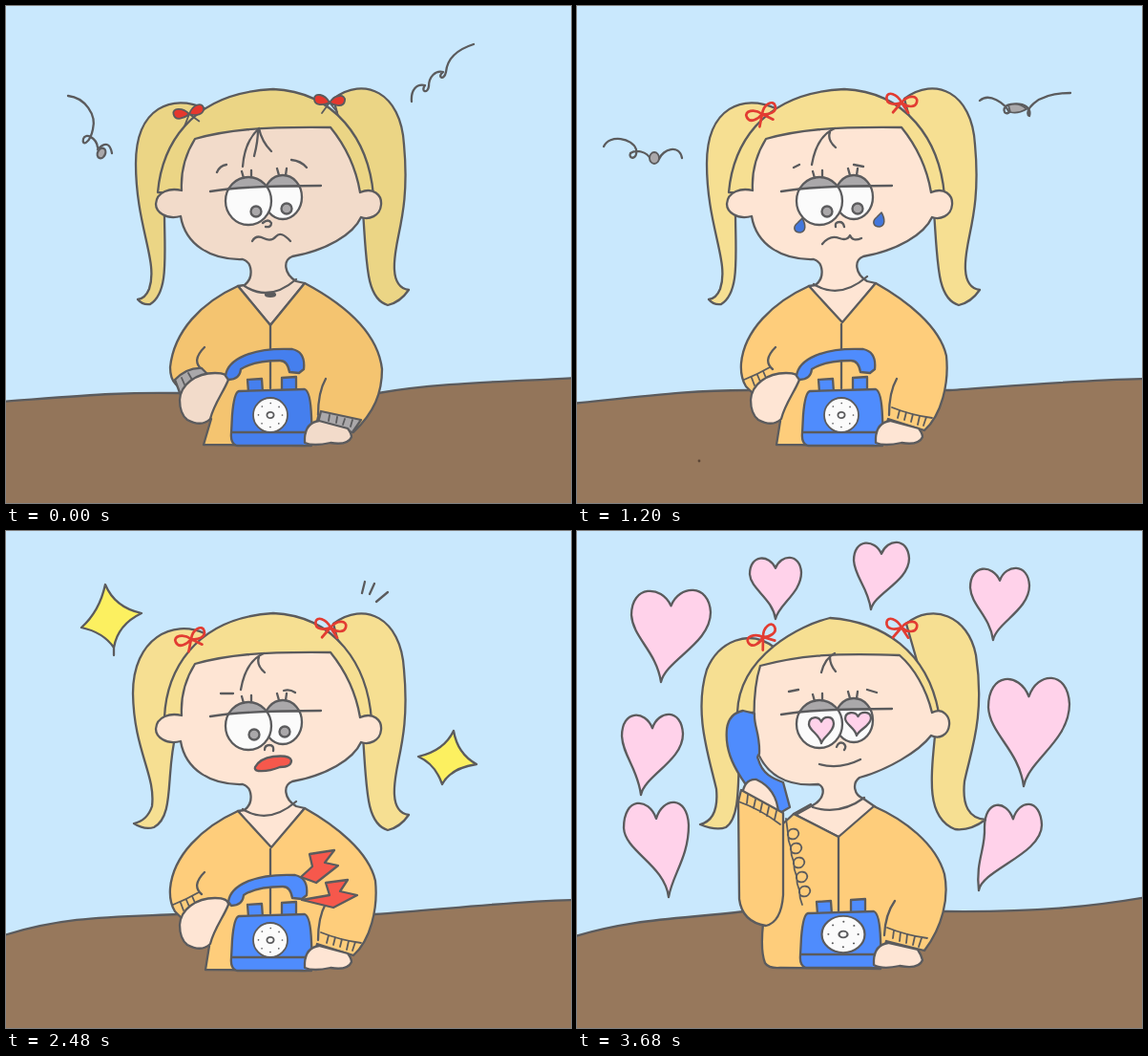
Write an HTML page that moves like this. It is 592 by 520 pixels and loops after 3760 ms.

```html
<!DOCTYPE html>
<html lang="en">
<head>
<meta charset="utf-8">
<title>Waiting for the call</title>
<style>
  html, body { margin: 0; width: 100%; height: 100%; overflow: hidden; background: #c9e8fd; }
  svg {
    display: block; width: 592px; height: 520px;
    --hair: #f6df92; --skin: #fee5d4; --shirt: #fecd7b; --phone: #4f8cfd; --table: #97785c;
    fill: none; stroke: #5b5b5d; stroke-width: 2.3; stroke-linecap: round; stroke-linejoin: round;
  }
  svg.dull { --hair: #ebd585; --skin: #f2dbca; --shirt: #f4c470; --phone: #457fee; --table: #93755a; }
  .hair { fill: var(--hair); } .skin { fill: var(--skin); } .shirt { fill: var(--shirt); }
  .phone { fill: var(--phone); } .grey { fill: #aaa8aa; } .white { fill: #fbfbfb; }
  .red { fill: #f6584c; } .pink { fill: #ffd2ea; } .tear { fill: #4377dc; stroke-width: 1.6; }
  .star { fill: #fcf060; } .ribbon { stroke: #e23c32; stroke-width: 2.7; }
  .thin { stroke-width: 1.8; } .flat { stroke: none; }
</style>
</head>
<body>
<!-- data-on lists the poses (0-5) in which a part is visible -->
<svg viewBox="0 0 592 520">
  <defs>
    <path id="bow" d="M0 0C-5-9-16-11-16-4C-16 4-6 3 0 0C6-9 17-9 16-2C15 5 6 4 0 0L-8 11M0 0L8 10"/>
    <path id="drop" d="M3-8C7-1 7 6 1 7C-6 7-7 1-2-3Z"/>
    <path id="curl" d="M0 0C2-7 13-5 11 2C8 9-2 7 0 0Q0 8 3 15"/>
    <g id="base">
      <path d="M254 404L253 391L268 390L269 404ZM289 403L289 389L304 388L304 403Z"/>
      <path d="M244 403L313 401Q319 403 320 430L321 455Q320 461 310 460L242 460Q235 458 236 447L237 428Q239 404 244 403ZM236 446L321 446"/>
    </g>
    <g id="dial">
      <circle class="white thin" r="18"/>
      <ellipse class="thin" rx="3.6" ry="3.2"/>
      <circle r="12.5" stroke-width="1.7" stroke-dasharray="0 9.8"/>
    </g>
  </defs>

  <path id="table" fill="var(--table)"/>
  <circle data-on="1" cx="128" cy="476" r="1.4" fill="#5b4636" stroke="none"/>

  <!-- squiggles -->
  <g data-on="0">
    <path d="M65 94C83 96 95 114 91 129C88 144 79 147 81 139C83 132 95 138 96 148"/>
    <ellipse class="grey" cx="100" cy="154" rx="4" ry="5.5" transform="rotate(25 100 154)"/>
    <path d="M96 150Q108 138 111 154M490 40C468 47 462 58 461 69C459 79 451 74 458 69C450 67 443 74 443 84C442 92 434 90 439 83C430 81 424 88 425 100"/>
  </g>
  <g data-on="1">
    <path d="M28 147C34 134 58 138 62 150C64 162 53 160 56 154C62 150 73 152 77 160M86 160C90 150 107 144 110 159"/>
    <ellipse class="grey thin" cx="81" cy="159" rx="5" ry="6"/>
    <path d="M422 99C432 90 448 102 453 111C447 116 444 104 454 103C470 100 476 108 474 115C468 112 478 91 517 91"/>
    <path class="grey thin" d="M452 104Q463 100 471 108Q462 113 454 111Z"/>
  </g>

  <!-- stars -->
  <g data-on="3">
    <path class="star" d="M104 56Q114 80 142 86Q117 98 113 122Q102 106 79 101Q98 84 104 56ZM113 121V130M469 209Q473 233 493 244Q466 248 457 265Q450 244 432 236Q459 230 469 209Z"/>
    <path d="M373 65L376 53M381 66L386 55M388 74L400 64"/>
  </g>

  <g id="hearts4" class="pink" data-on="4"></g>
  <g id="hearts8" class="pink" data-on="5"></g>
  <path data-on="4" class="thin" d="M107 282L124 279M110 290L124 289M430 283L441 278M437 287L455 277"/>

  <!-- pigtails -->
  <g class="hair">
    <path data-on="01" d="M208 107C175 92 136 105 136 165C136 230 160 268 150 296Q146 306 138 307Q143 313 151 312C171 300 166 260 166 215Z"/>
    <path data-on="23" d="M208 107C175 92 133 112 133 170C134 230 157 255 153 288Q148 303 134 306Q145 313 155 310C177 298 167 255 178 212Z"/>
    <path data-on="0123" d="M343 97C375 73 414 90 417 145C424 220 405 245 407 276Q408 295 422 297Q413 310 400 313C377 306 378 270 374 215Z"/>
    <path data-on="4" d="M204 122C190 106 154 110 134 130C112 165 128 205 135 232Q135 264 103 266C130 274 152 258 148 228C144 204 148 182 160 184Q170 186 174 198ZM346 101C372 84 405 104 413 142C420 185 416 220 425 238Q437 253 454 243Q444 264 428 272C402 270 390 252 391 225C393 190 392 160 376 157Z"/>
    <path data-on="5" d="M207 122C180 101 148 116 136 145C122 190 138 235 146 270Q149 302 129 307Q146 314 156 310C174 298 167 250 172 195ZM345 97C372 75 410 88 418 130C428 195 412 232 406 262Q402 300 428 302Q412 314 396 312C366 300 370 262 376 205Z"/>
    <!-- crown -->
    <path data-on="01" d="M159 195C163 150 190 91 280 87C345 90 380 140 385 198Z"/>
    <path data-on="23" d="M166 195C168 150 195 91 280 86C345 89 379 140 383 198Z"/>
    <path data-on="4" d="M173 190C175 140 205 96 272 93C325 96 370 140 380 190Z"/>
    <path data-on="5" d="M168 190C170 130 235 98 265 91C320 95 367 125 379 190Z"/>
  </g>

  <!-- face and neck -->
  <g class="skin">
    <path data-on="0123" d="M198 139C230 130 265 126 340 127C353 143 366 165 371 195C385 189 394 198 393 208C392 220 380 224 372 221C364 239 335 256 300 262C290 266 291 280 304 288L313 290L277 334L243 293L250 292C260 284 258 268 248 265C215 266 188 250 183 220C167 224 157 215 157 207C158 194 172 190 184 193C183 175 188 155 198 139Z"/>
    <path data-on="45" d="M192 141C230 131 265 127 338 130C353 143 366 165 372 190C384 184 391 195 390 203C389 214 379 218 371 214C358 231 325 250 296 258C288 264 290 276 300 280L313 289L276 321L229 297L247 287C260 280 260 268 253 265C220 268 196 255 187 225C184 190 186 160 192 141Z"/>
  </g>
  <path data-on="0" d="M265 128C252 140 249 155 248 168M264 129Q264 142 260 157M265 128Q268 142 278 152M250 293Q276 310 304 286"/>
  <ellipse data-on="0" cx="277" cy="302" rx="5" ry="1.8" fill="#5b5b5d"/>
  <path data-on="123" d="M270 128C256 134 249 149 246 166M265 132Q262 140 271 148M248 291Q275 308 304 283"/>
  <path data-on="45" d="M270 128C262 132 258 140 256 148M265 132Q265 140 271 147M247 289Q275 298 301 279"/>

  <!-- eyes -->
  <g id="eyes">
    <ellipse class="white flat" cx="290" cy="200" rx="20" ry="23"/>
    <path class="grey flat" d="M272 190A20 23 0 0 1 308 190Z"/>
    <ellipse cx="290" cy="200" rx="20" ry="23"/>
    <ellipse class="white flat" cx="254" cy="204" rx="24" ry="25"/>
    <path class="grey flat" d="M234 190A24 25 0 0 1 274 190Z"/>
    <ellipse cx="254" cy="204" rx="24" ry="25"/>
    <path d="M214 194Q250 188 330 188M249 180L247 173M257 179V172M286 177L284 170M293 177L294 170"/>
  </g>
  <g id="pupils" class="grey" data-on="01234">
    <ellipse cx="262" cy="215" rx="5.5" ry="5.5"/><ellipse cx="294" cy="212" rx="5.5" ry="5.5"/>
  </g>
  <g id="heartEyes" class="pink" data-on="5"></g>

  <!-- brows, nose, mouth -->
  <path data-on="0" d="M221 174Q224 167 231 166M299 161Q309 162 315 169M269 227Q275 222 278 227Q278 232 272 231M258 246Q262 239 270 243T283 241T298 246"/>
  <path data-on="12" d="M227 169L233 166M290 166L300 168M271 231Q270 226 275 226Q279 226 280 231M257 249Q265 239 275 243Q283 246 286 240Q289 247 298 243"/>
  <path data-on="3" d="M225 170L238 170M291 167Q297 165 303 169M271 229Q271 224 276 224Q281 224 280 230"/>
  <path data-on="3" class="red" d="M261 247Q266 238 280 236Q297 234 299 240Q299 247 287 247Q275 252 264 251Q260 250 261 247Z"/>
  <path data-on="4" d="M223 167L238 166M299 163L312 160M272 228Q273 222 279 222Q283 225 280 230M255 244Q285 252 300 235"/>
  <path data-on="5" d="M222 168L232 166M304 166L314 169M272 226Q274 220 279 222Q283 225 280 229M254 244Q275 250 297 239"/>
  <g class="tear">
    <g data-on="1"><use href="#drop" x="233" y="230"/><use href="#drop" x="316" y="224"/></g>
    <g data-on="2"><use href="#drop" x="234" y="247"/><use href="#drop" x="315" y="239"/></g>
  </g>

  <!-- bows -->
  <g data-on="0" fill="#e5382e" class="thin">
    <use href="#bow" transform="translate(192 113) rotate(-15)"/>
    <use href="#bow" transform="translate(339 101)"/>
  </g>
  <g class="ribbon">
    <use data-on="123" href="#bow" transform="translate(194 113) rotate(-25)"/>
    <use data-on="4" href="#bow" transform="translate(187 121) rotate(-22) scale(1.1)"/>
    <use data-on="5" href="#bow" transform="translate(195 111) rotate(-35)"/>
    <use data-on="12345" href="#bow" transform="translate(340 101) rotate(5)"/>
  </g>

  <!-- sitting with the phone on the table -->
  <g data-on="0123">
    <path class="shirt" data-on="0" d="M243 293C205 310 176 340 172 378Q172 390 178 396L215 432L207 459L320 460L327 430L364 446C386 425 394 405 394 380C390 345 360 315 313 290L277 334Z"/>
    <path class="shirt" data-on="123" d="M243 293C205 310 175 340 172 374Q171 388 177 398L213 434L209 459L320 460L326 432L364 444C382 428 390 395 387 366C380 335 345 308 313 290L278 331Z"/>
    <path d="M277 333V400M208 357Q194 371 205 380M335 390Q327 404 327 428"/>
    <g data-on="0">
      <path class="grey" d="M177 391Q190 378 205 379L212 386L184 410ZM330 424L372 433L363 446L327 436Z"/>
      <path class="thin" d="M184 389L187 396M191 384L195 391M339 428L338 434M347 430L346 436M355 432L353 438M363 433L361 440"/>
    </g>
    <path data-on="123" class="thin" d="M175 391Q188 386 202 378M183 389L186 397M189 386L192 393M195 382L198 389M330 420Q350 428 372 431M338 423L336 431M345 425L343 433M352 427L350 435M359 429L357 438M366 430L363 439"/>
    <path class="skin" d="M182 412C183 396 199 384 219 384Q233 384 233 391C228 404 218 416 214 432Q205 441 190 433Q182 427 182 412Z"/>
    <path class="red" data-on="23" d="M318 338L344 334L334 347L348 350L325 368L309 362L321 351ZM335 368L358 365L350 377L368 381L343 394L310 386L339 381Z"/>
    <g class="phone">
      <path id="receiver" d="M230 387C232 370 257 357 300 359Q314 362 312 380L307 384L297 383Q295 371 287 371C270 371 255 374 246 380Q245 391 233 391Z"/>
      <use href="#base"/>
    </g>
    <use href="#dial" transform="translate(277 428)"/>
    <path class="skin" d="M313 452Q314 436 328 434L358 442Q362 447 362 451Q358 460 340 457Q322 461 313 457Z"/>
  </g>

  <!-- talking -->
  <g id="talking" data-on="45">
    <path class="shirt" d="M229 297L217 308L197 412Q194 440 199 453Q203 459 215 458L320 459L326 430L366 440C385 415 392 385 387 360C378 328 345 303 313 289L276 321Z"/>
    <path d="M276 321V399M229 297L247 287M335 388Q325 402 324 424"/>
    <path class="thin" d="M327 416Q347 424 369 427M334 419L333 427M341 421L340 430M348 423L347 432M356 425L354 434M363 427L360 436"/>
    <path class="thin" d="M221 302L223 317"/>
    <g id="curls" class="thin"></g>
    <path class="phone" d="M159 208Q161 192 176 189L188 192C187 205 194 213 193 234Q190 237 192 240C196 255 207 260 218 264L225 290L213 297C205 275 190 272 178 265C164 245 157 228 159 208Z"/>
    <path class="skin" d="M175 278Q177 260 190 261C205 268 212 280 213 296Z"/>
    <path class="shirt" d="M174 272L218 296V382Q216 410 200 414Q175 410 172 386L171 284Z"/>
    <path class="thin" d="M171 284Q194 292 215 308M181 277L180 286M189 282L187 291M196 286L194 295M203 290L201 299M211 294L209 303"/>
    <g class="phone"><use href="#base" y="-2"/></g>
    <use href="#dial" transform="translate(281 423) scale(1.25 1.06)"/>
    <path class="skin" d="M313 450Q314 434 328 432L359 439Q363 445 364 450Q360 460 340 456Q322 460 313 455Z"/>
  </g>
</svg>
<script>
const LOOP = 3760;
const CUTS = [640, 1360, 2000, 2720, 3360];
const TABLES = [
  'M-5 414C90 407 120 404 180 405H390C450 394 530 393 597 389V525H-5Z',
  'M-5 416C90 406 120 402 180 402H390C450 398 530 391 597 390V525H-5Z',
  'M-5 418C80 410 110 405 180 404H388C450 400 530 389 597 388V525H-5Z',
  'M-5 424C60 403 110 404 180 401H386C450 397 530 387 597 386V525H-5Z',
  'M-5 430C20 408 90 412 175 396L386 398C470 402 540 388 597 380V525H-5Z',
  'M-5 425C60 405 110 406 175 398H386C480 399 540 393 597 383V525H-5Z'
];
const $ = id => document.getElementById(id);
const svg = document.querySelector('svg');
const parts = [...document.querySelectorAll('[data-on]')];

// Heart inside a box, with the tip at its own x
function heart([x, y, w, h, tip]) {
  const p = (u, v) => `${x + u * w} ${y + v * h} `;
  const t = (tip - x) / w;
  return `<path d="M${p(.5, .17)}C${p(.38, -.06)}${p(0, -.06)}${p(0, .27)}` +
    `C${p(.02, .52)}${p(t - .06, .66)}${p(t, 1)}` +
    `C${p(t + .06, .76)}${p(1, .58)}${p(1, .24)}C${p(.98, -.08)}${p(.6, -.06)}${p(.5, .17)}Z"/>`;
}
const hearts = (id, list) => $(id).innerHTML = list.map(heart).join('');

hearts('hearts4', [[69, 56, 74, 83, 95], [50, 185, 56, 77, 71], [414, 43, 62, 73, 445], [433, 145, 97, 141, 486]]);
hearts('hearts8', [[57, 62, 83, 96, 88], [181, 28, 54, 64, 208], [290, 12, 58, 70, 308], [412, 39, 62, 75, 436],
  [431, 154, 85, 113, 468], [47, 192, 64, 84, 67], [49, 284, 68, 99, 96], [427, 286, 60, 90, 421]]);
hearts('heartEyes', [[243, 195, 26, 27, 256], [281, 190, 27, 24, 293]]);
for (let i = 0; i < 5; i++) $('curls').innerHTML += `<use href="#curl" x="${223 + 3 * i}" y="${317 + 15 * i}"/>`;

const PUPIL_SHIFT = ['0 0', '0 0', '-1 1', '-2 -2', '2 -3', '0 0'];
let shown = -1;

function show(pose) {
  const move = (id, by) => $(id).setAttribute('transform', `translate(${by})`);
  shown = pose;
  svg.classList.toggle('dull', pose === 0);
  for (const part of parts) part.style.display = part.dataset.on.includes(pose) ? '' : 'none';
  $('table').setAttribute('d', TABLES[pose]);
  move('pupils', PUPIL_SHIFT[pose]);
  move('eyes', pose > 3 ? '0 -2' : '0 0');
  move('receiver', pose > 1 ? '3 1' : '0 0');
  move('talking', pose === 5 ? '-2 -1' : '0 0');
}

function frame() {
  const t = performance.now() % LOOP;
  const pose = CUTS.filter(cut => t >= cut).length;
  if (pose !== shown) show(pose);
  requestAnimationFrame(frame);
}
frame();
</script>
</body>
</html>
```
